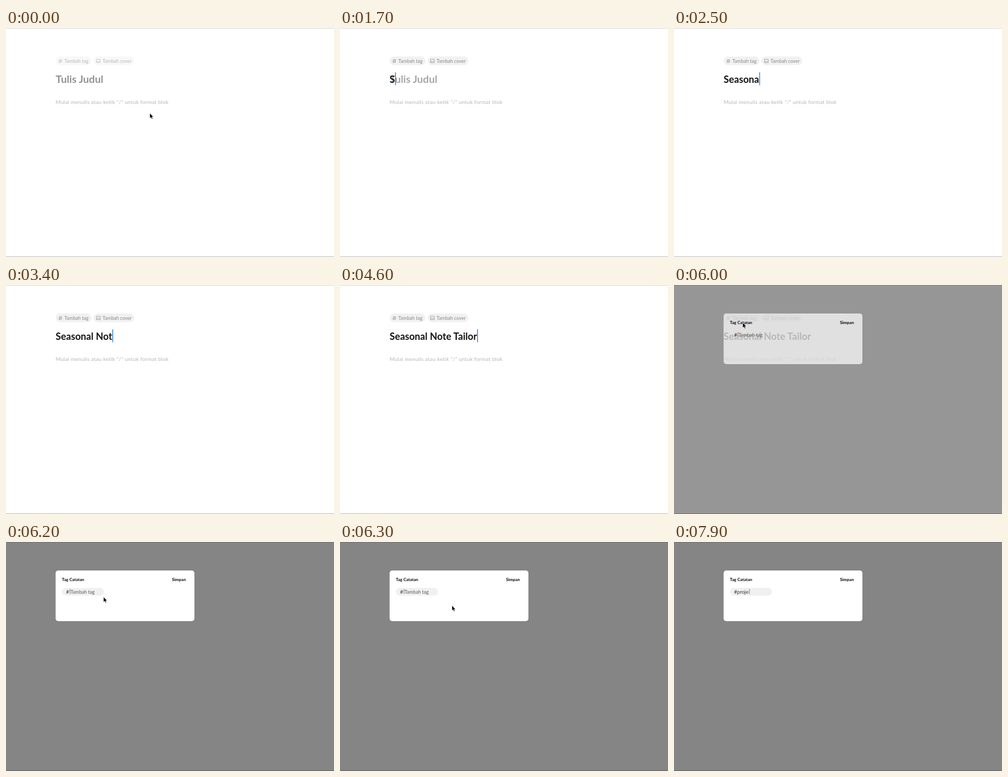
Recreate the animation shown at these times as an HTML page. Size 618 by 434 pixels, loop 8 s.

```html
<!DOCTYPE html>
<html lang="id">
<head>
<meta charset="utf-8">
<title>Editor catatan</title>
<style>
  html, body { margin: 0; width: 100%; height: 100%; overflow: hidden; background: #fff; }
  svg { display: block; }
  text { font-family: Lato, sans-serif; font-size: 9px; white-space: pre; }
  .bold { font-weight: 700; }
  .small { font-size: 8px; font-weight: 700; }
  .icon { fill: none; stroke: currentColor; stroke-width: .7; stroke-linejoin: round; }
</style>
</head>
<body>
<svg width="618" height="434" viewBox="0 0 618 434">
  <rect width="618" height="434" fill="#fff"/>
  <rect width="618" height="1" fill="#d6d6d6"/>
  <rect y="433" width="618" height="1" fill="#b8b8b8"/>

  <g id="pills">
    <rect id="tagPill" x="93.5" y="54" width="67.5" height="16.5" rx="8.2"/>
    <rect id="coverPill" x="165" y="54" width="76.5" height="16.5" rx="8.2"/>
    <path class="icon" d="M99.2 61H106M98.7 64.3H105.5M101.6 59.2L100.5 66.2M104.3 59.2L103.2 66.2"/>
    <path class="icon" d="M170.6 59.3H177.6V65.7H170.6ZM171 65L173 62.8L174.5 64.2L175.8 63L177.5 64.7"/>
    <text x="110" y="66" fill="currentColor">Tambah tag</text>
    <text x="182" y="66" fill="currentColor">Tambah cover</text>
  </g>

  <text id="titleHint" class="bold" x="93.5" y="104" style="font-size:19.6px">Tulis Judul</text>
  <text id="title" class="bold" x="93.5" y="104" style="font-size:18.2px" fill="#141414"></text>
  <rect id="titleCaret" y="84" width="1.5" height="24.5" fill="#2b80dc"/>
  <text x="93.5" y="144" style="font-size:10px;letter-spacing:.25px" fill="#b6b6b6">Mulai menulis atau ketik “/” untuk format blok</text>

  <rect id="shade" width="618" height="434"/>
  <g id="modal">
    <rect id="sheet" x="93.5" y="54" width="261.5" height="96" rx="5" fill="#fff"/>
    <rect id="field" x="105.5" y="87" width="79" height="14.5" rx="7.2" fill="#f0f0f0"/>
    <text class="small" x="105.3" y="74">Tag Catatan</text>
    <text class="small" x="312.7" y="74">Simpan</text>
    <text id="tagHint" x="121.5" y="98" fill="#5c5c5c">Tambah tag</text>
    <text id="tag" x="113.2" y="98" style="font-size:9.6px" fill="#333"></text>
    <rect id="tagCaret" y="89" width="1.1" height="9.5" fill="#c4683f"/>
  </g>

  <path id="cursor" d="M0 0V9.6L2.2 7.6L3.7 11L5.3 10.3L3.9 7H6.7Z" stroke="#fff" stroke-width=".5"/>
</svg>
<script>
const LOOP = 8000, STEP = 100;
const $ = id => document.getElementById(id);
const set = (id, attrs) => { for (const k in attrs) $(id).setAttribute(k, attrs[k]); };
const show = (id, on) => { $(id).style.display = on ? '' : 'none'; };
const between = (t, a, b) => t >= a && t < b;

// Key times in units of 100 ms, one per typed character
const TITLE = 'Seasonal Note Tailor';
const titleKeys = [17, 19, 20, 22, 23, 24, 25, 27, 28, 30, 32, 34, 35, 36, 39, 41, 41, 43, 44, 46];
const TAG = 'proje';
const tagKeys = [73, 74, 76, 77, 79];

// Pointer path: time, x, y
const path = [
  [0, 271, 161.5], [200, 253, 136], [400, 253, 136], [500, 228, 97], [4800, 228, 101],
  [5100, 190, 85], [5300, 155, 55], [5500, 135, 43], [5700, 121, 56],
  [5900, 118.5, 61.5], [6000, 129.5, 71.5], [6300, 211, 120.5], [6600, 240, 138]
];

function pointer(t) {
  const i = path.findIndex(p => p[0] > t);
  if (i < 0) return path[path.length - 1].slice(1);
  const [a, b] = [path[i - 1], path[i]], k = (t - a[0]) / (b[0] - a[0]);
  return [1, 2].map(n => a[n] + (b[n] - a[n]) * k);
}

function type(id, text, caret, origin) {
  const el = $(id);
  if (el.textContent !== text) el.textContent = text;
  set(caret, { x: origin + (text ? el.getComputedTextLength() : 0) + .3 });
}

function draw(t) {
  const typed = (text, keys) => text.slice(0, keys.filter(k => k * STEP <= t).length);

  const hover = between(t, 5800, 6000);
  const pillFill = t < 900 ? '#f8f8f8' : '#f1f1f1';
  set('tagPill', { fill: hover ? '#d5d5d5' : pillFill });
  set('coverPill', { fill: hover ? '#f6f6f6' : pillFill });
  $('pills').style.color = t < 200 ? '#b8b8b8' : t < 500 ? '#a8a8a8' : t < 900 ? '#989898' : '#888';

  show('titleHint', t < 1800);
  set('titleHint', { fill: t < 1100 ? '#929292' : '#a6a6a6' });
  type('title', typed(TITLE, titleKeys), 'titleCaret', 93.5);
  show('titleCaret', between(t, 1100, 4900));

  const open = t >= 6000;
  show('shade', open);
  show('modal', open);
  set('shade', { opacity: t < 6100 ? .41 : t < 6200 ? .46 : .48 });
  set('sheet', { opacity: t < 6100 ? .7 : t < 6200 ? .93 : 1 });
  show('field', t >= 6100);
  show('tagHint', t < tagKeys[0] * STEP);
  type('tag', '#' + typed(TAG, tagKeys), 'tagCaret', 113.2 + 1);
  show('tagCaret', !between(t, 6700, 7100));

  show('cursor', t < 900 || between(t, 4900, 6600));
  set('cursor', { transform: `translate(${pointer(t)})` });
}

const start = performance.now();
function tick() {
  const t = (performance.now() - start) % LOOP;
  draw(Math.floor(t / STEP) * STEP);
  requestAnimationFrame(tick);
}
tick();
</script>
</body>
</html>
```
